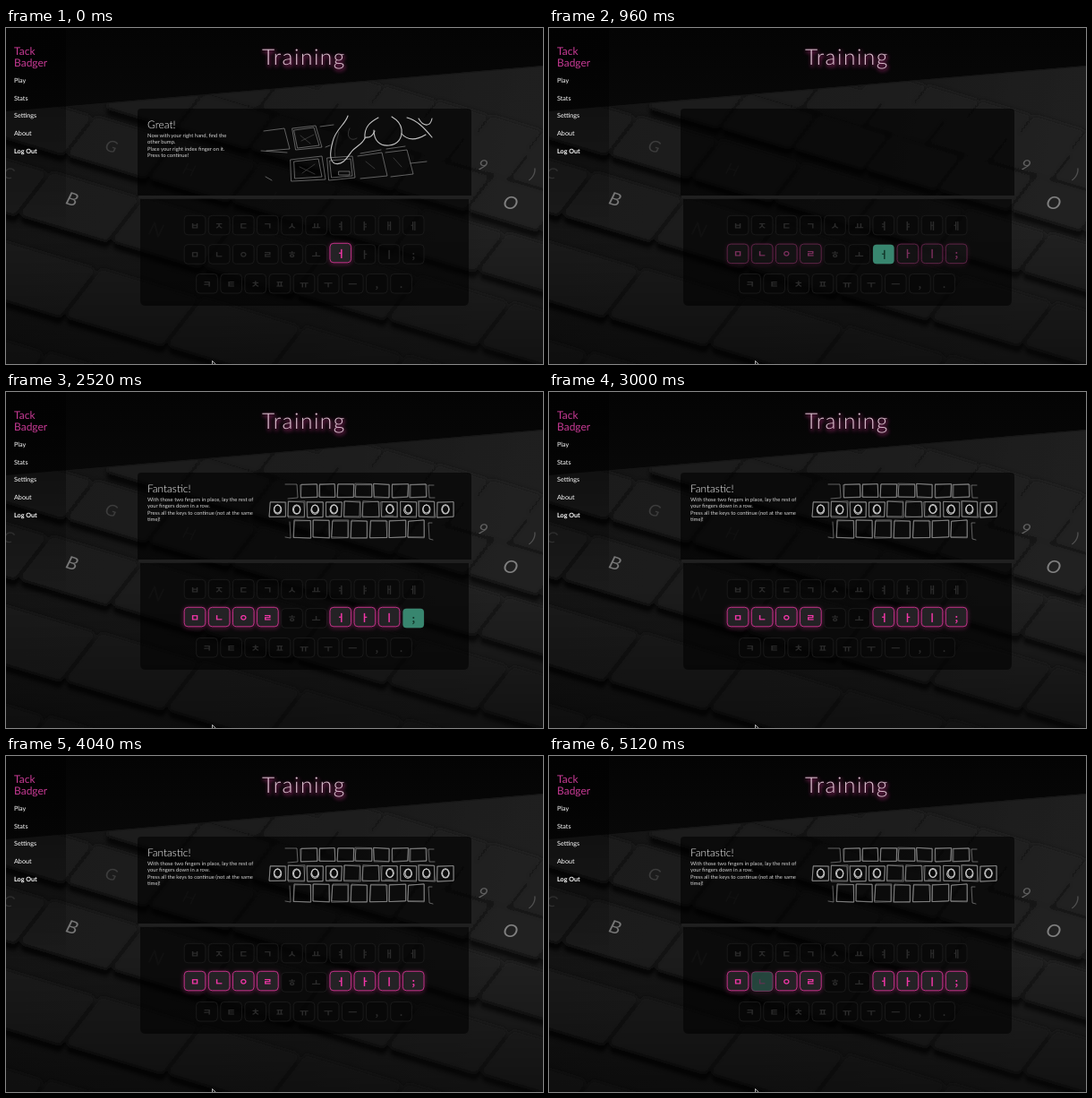
An HTML page that plays this animation: 600 px wide and 375 px high, repeating every 5.16 s.

```html
<!DOCTYPE html>
<html lang="en">
<head>
<meta charset="utf-8">
<title>Typing training</title>
<style>
  html, body { margin: 0; width: 100%; height: 100%; overflow: hidden; background: #080808; }
  svg { display: block; width: 100vw; height: 100vh; }
  text { font-family: Lato, "Open Sans", sans-serif; fill: #fff; text-rendering: geometricPrecision; }
  .jamo { font: 700 11px "Noto Sans CJK KR", "Noto Sans CJK", "Noto Sans CJK JP", sans-serif; text-anchor: middle; }
  .sketch path { fill: none; stroke: #9a9a9a; stroke-width: .6; stroke-linecap: round; stroke-linejoin: round; }
  .sketch .faint { stroke: #555; stroke-width: .6; }
  .sketch .bold { stroke-width: 1.1; stroke: #c4c4c4; }
</style>
</head>
<body>
<svg id="stage" viewBox="0 0 600 375">
  <defs>
    <linearGradient id="desk" x2="1" y2=".25">
      <stop offset="0" stop-color="#0d0d0d"/><stop offset="1" stop-color="#141414"/>
    </linearGradient>
    <linearGradient id="cap" gradientUnits="userSpaceOnUse" x1="0" x2="600" y1="0" y2="120">
      <stop offset="0" stop-color="#101010"/><stop offset=".6" stop-color="#151515"/><stop offset="1" stop-color="#222"/>
    </linearGradient>
    <linearGradient id="wall" x2="0" y2="1">
      <stop offset="0" stop-color="#040404"/><stop offset="1" stop-color="#080808"/>
    </linearGradient>
    <linearGradient id="side" x2="0" y2="1">
      <stop offset="0" stop-color="#000" stop-opacity=".6"/><stop offset=".6" stop-color="#000" stop-opacity="0"/>
    </linearGradient>
    <linearGradient id="floor" x2="0" y2="1">
      <stop offset=".6" stop-color="#000" stop-opacity="0"/><stop offset="1" stop-color="#000" stop-opacity=".45"/>
    </linearGradient>
    <filter id="soft" x="-20%" y="-20%" width="140%" height="140%"><feGaussianBlur stdDeviation="2"/></filter>
    <filter id="glow" x="-50%" y="-50%" width="200%" height="200%"><feGaussianBlur stdDeviation="2.2"/></filter>
  </defs>
</svg>
<script>
const LOOP = 5160;
const PINK = '#d23492';
const stage = document.getElementById('stage');

function add(parent, tag, attrs = {}, content = '') {
  const node = document.createElementNS('http://www.w3.org/2000/svg', tag);
  for (const name in attrs) node.setAttribute(name, attrs[name]);
  node.textContent = content;
  return parent.appendChild(node);
}
function label(parent, content, x, y, size, attrs = {}) {
  return add(parent, 'text', { x, y, 'font-size': size, ...attrs }, content);
}
function box(parent, x, y, width, height, attrs) {
  return add(parent, 'rect', { x, y, width, height, ...attrs });
}

let seed = 7;
function jitter(amount) {
  seed = (seed * 16807) % 2147483647;
  return (seed / 2147483647 - .5) * 2 * amount;
}

// Backdrop: a blurred keyboard on a skewed lattice that grows towards the viewer
function drawBackdrop() {
  box(stage, 0, 0, 600, 375, { fill: 'url(#desk)' });
  const shadows = add(stage, 'g', { filter: 'url(#soft)' });
  const caps = add(stage, 'g', { filter: 'url(#soft)' });
  for (let row = -3; row < 4; row++) {
    const scale = 1 + row * .12;
    for (let col = -4; col < 8; col++) {
      const x = 128 + (col * 92 - row * 41) * scale, y = 133 + (col * 26 + row * 59) * scale;
      if (x < -90 || x > 690 || y < 60 || y > 430) continue;
      const d = 'M-26 -30L54 -6L26 30L-54 6Z';
      add(shadows, 'path', { d, transform: `translate(${x} ${y + 8}) scale(${scale})`, fill: '#040404', stroke: '#040404', 'stroke-width': 9, 'stroke-linejoin': 'round' });
      add(caps, 'path', { d, transform: `translate(${x} ${y}) scale(${scale})`, fill: '#131313', stroke: '#131313', 'stroke-width': 9, 'stroke-linejoin': 'round' });
    }
  }
  box(stage, 0, 0, 600, 375, { fill: 'url(#cap)', style: 'mix-blend-mode:screen', opacity: .35 });
  const legends = [['B', 74, 191, 20, '#777'], ['N', 168, 225, 21, '#282828'], ['G', 118, 132, 18, '#3c3c3c'],
    ['H', 205, 158, 18, '#282828'], ['J', 298, 188, 18, '#222'], ['O', 564, 195, 20, '#808080'],
    ['9', 533, 153, 17, '#606060'], [')', 589, 163, 17, '#505050'], ['C', 3, 162, 17, '#383838']];
  for (const [char, x, y, size, fill] of legends) {
    label(stage, char, 0, size * .36, size, { style: `fill:${fill}`, 'text-anchor': 'middle', transform: `translate(${x} ${y}) rotate(18) skewX(-8)` });
  }
  add(stage, 'path', { d: 'M0 0H600V42L0 93Z', fill: 'url(#wall)' });
  add(stage, 'path', { d: 'M67 88L600 42.5', stroke: '#161616', 'stroke-width': 1 });
  box(stage, 0, 0, 600, 375, { fill: 'url(#floor)' });
  box(stage, 0, 0, 67, 375, { fill: 'url(#side)' });
}

function drawChrome() {
  ['Tack', 'Badger'].forEach((word, i) =>
    label(stage, word, 9, 29.5 + i * 13.7, 12, { style: 'fill:#c73a94' }));
  ['Play', 'Stats', 'Settings', 'About', 'Log Out'].forEach((item, i) =>
    label(stage, item, 9, 60.8 + i * 19.8, 7.2, { 'font-weight': i === 4 ? 700 : 400 }));

  const title = { 'font-weight': 300, 'letter-spacing': 1.5 };
  label(stage, 'Training', 287, 42.5, 24.5, { ...title, style: `fill:${PINK};stroke:${PINK};stroke-width:.8`, filter: 'url(#glow)', opacity: .65 });
  label(stage, 'Training', 286, 41, 24.5, { ...title, style: 'fill:#dcc0d0' });

  add(stage, 'path', { d: 'M147 187V94Q147 90 151 90H516Q520 90 520 94V187Z', fill: '#000', 'fill-opacity': .6 });
  add(stage, 'path', { d: 'M150 191H517V304Q517 310 511 310H156Q150 310 150 304Z', fill: '#000', 'fill-opacity': .58 });
  box(stage, 148, 187, 372, 3.6, { fill: '#202020' });

  add(stage, 'path', { d: 'M230.5 371.5V382L236 377Z', fill: '#000', stroke: '#ddd', 'stroke-width': .8 });
}

// Two loose passes give each outline a hand-drawn look
function sketchBox(parent, x, y, w, h) {
  const corner = (cx, cy) => `${cx + jitter(.8)} ${cy + jitter(.8)}`;
  for (let pass = 0; pass < 2; pass++) {
    add(parent, 'path', { d: `M${corner(x, y)}L${corner(x + w, y)}L${corner(x + w, y + h)}L${corner(x, y + h)}Z` });
  }
}

function lesson(title, lines) {
  const group = add(stage, 'g');
  label(group, title, 158, 112, 11.9, { 'font-weight': 300 });
  lines.forEach((line, i) =>
    label(group, line, 158, [122, 128.7, 136.8, 143.5][i], 5.88, { style: 'fill:#d4d4d4' }));
  return group;
}

function drawFingerLesson() {
  const group = lesson('Great!', ['Now with your right hand, find the', 'other bump.',
    'Place your right index finger on it.', 'Press to continue!']);
  const art = add(group, 'g', { class: 'sketch' });
  const line = (d, kind = '') => add(art, 'path', { d, class: kind });
  line('M288 115L311 112L317 135L291 137M285 137L314 139M297 170L290 166');
  line('M320 112L346 109L353 133L324 136ZM322 114L344 111L350 131L326 134Z');
  line('M318 147L353 143L357 169L319 171ZM322 149L349 146L353 166L323 168Z');
  line('M359 145L387 143L390 167L361 170ZM362 148L385 146L387 165L364 167Z');
  line('M393 143L420 139L426 165L396 168M424 139L448 136L455 163L430 166M452 151L470 149');
  line('M351 110L366 108M357 133L362 131M396 140L419 136M425 135L446 132M372 160H384V164H372Z');
  line('M329 120L340 129M330 126L344 119M328 155L345 163M331 162L345 152M402 149L412 157M433 145L442 155', 'faint');
  line('M382 98C379 108 368 113 365 127C362 138 361 148 367 151C376 154 381 145 386 138C391 132 398 130 401 123', 'bold');
  line('M401 123C400 110 407 105 416 100M401 122C408 123 410 119 412 115', 'bold');
  line('M411 114C411 126 418 132 428 131C438 130 443 123 442 113C441 106 436 102 431 99', 'bold');
  line('M442 118C449 126 459 125 469 119M448 100C459 103 467 111 476 122M461 101C466 110 474 111 476 101', 'bold');
  line('M372 116C369 128 366 136 368 145M384 112C379 122 386 127 392 123', 'faint');
  return group;
}

function drawRowLesson() {
  const group = lesson('Fantastic!', ['With those two fingers in place, lay the rest of',
    'your fingers down in a row.', 'Press all the keys to continue (not at the same', 'time)!']);
  const art = add(group, 'g', { class: 'sketch' });
  for (let i = 0; i < 7; i++) {
    sketchBox(art, 330 + i * 20.3, 103, 17.5, 14.5);
    sketchBox(art, 322 + i * 21.3, 143.5, 18, 19);
  }
  for (let i = 0; i < 10; i++) {
    const x = 295 + i * 20.8;
    sketchBox(art, x, 122.5, 17.5, 17);
    if (i === 4 || i === 5) continue;
    for (const r of [3.6, 4.2]) {
      const cx = x + 8.7 + jitter(.5), cy = 131 + jitter(.5);
      add(art, 'path', { class: 'bold', d: `M${cx} ${cy - r - .9}a${r} ${r + .9} 0 1 0 .1 0` });
    }
    if (i === 3 || i === 6) add(art, 'path', { d: `M${x + 4} 138H${x + 13}` });
  }
  add(art, 'path', { d: 'M312 103H325L326 118L315 119M478 104H472L473 118H479M312 162L318 163L317 145M476 146H472L473 164L477 165' });
  return group;
}

function makeKey(char, cx, top) {
  const group = add(stage, 'g');
  const shape = attrs => [cx - 11.8, top, 23.6, 21.5, { rx: 4, ...attrs }];
  const glyph = (parent, fill) => add(parent, 'text', { class: 'jamo', x: cx, y: top + 15.3, style: `fill:${fill}` }, char);
  const layer = () => add(group, 'g', { opacity: 0 });

  const idle = add(group, 'g');
  box(idle, ...shape({ fill: '#060606', 'fill-opacity': .6, stroke: '#1f1f1f', 'stroke-width': .8 }));
  glyph(idle, '#2b2b2b');

  const lit = layer();
  box(lit, ...shape({ fill: 'none', stroke: PINK, 'stroke-width': 2, filter: 'url(#glow)', opacity: .5, transform: 'translate(0 1)' }));
  box(lit, ...shape({ fill: '#242225', stroke: PINK, 'stroke-width': .9 }));
  glyph(lit, '#f237a8');

  const pressed = layer();
  box(pressed, ...shape({ fill: '#38866f' }));
  glyph(pressed, '#123529');
  return { char, group, lit, pressed };
}

drawBackdrop();
drawChrome();
const fingerLesson = drawFingerLesson();
const rowLesson = drawRowLesson();
const rows = [['ㅂㅈㄷㄱㅅㅛㅕㅑㅐㅔ', 211, 209.3], ['ㅁㄴㅇㄹㅎㅗㅓㅏㅣ;', 211, 241.7], ['ㅋㅌㅊㅍㅠㅜㅡ,.', 224.5, 274.5]];
const keys = rows.flatMap(([chars, x, top]) => [...chars].map((char, i) => makeKey(char, x + i * 27.13, top)));
const homeKeys = keys.filter(key => 'ㅁㄴㅇㄹㅓㅏㅣ;'.includes(key.char));

// Press start and release times, in ms
const presses = { 'ㅓ': [600, 1060], ';': [2340, 2680], 'ㅏ': [3020, 3340], 'ㅁ': [4060, 4330], 'ㄴ': [5075, 5400] };

const ramp = (t, from, to) => Math.min(1, Math.max(0, (t - from) / (to - from)));

function pressAmount(char, t) {
  if (!presses[char]) return 0;
  const [down, up] = presses[char];
  return ramp(t, down, down + 110) * (1 - ramp(t, up, up + 170));
}

function render(t) {
  fingerLesson.setAttribute('opacity', 1 - ramp(t, 600, 900));
  rowLesson.setAttribute('opacity', ramp(t, 1040, 1520));
  for (const key of homeKeys) {
    const lit = key.char === 'ㅓ' ? 1 : ramp(t, 800, 1200);
    const press = pressAmount(key.char, t);
    key.group.setAttribute('transform', `translate(0 ${-1.4 * lit * (1 - press)})`);
    key.lit.setAttribute('opacity', lit * (1 - press));
    key.pressed.setAttribute('opacity', press);
  }
}

function tick() {
  render(performance.now() % LOOP);
  requestAnimationFrame(tick);
}
tick();
</script>
</body>
</html>
```
